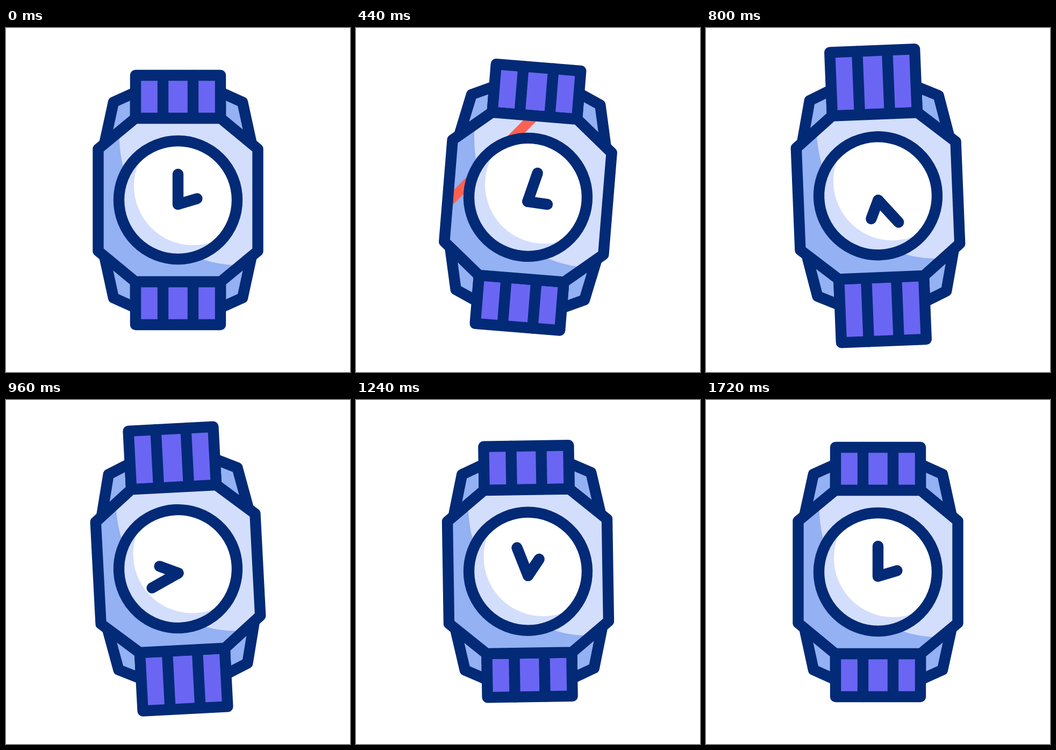
These frames come from a looping animation (640 px wide and 640 px high, 1.8 s). An HTML page with a canvas:

```html
<!DOCTYPE html>
<html lang="en">
<head>
<meta charset="utf-8">
<title>Watch</title>
<style>
  html, body { margin: 0; width: 100%; height: 100%; overflow: hidden; background: #fff; }
  canvas { display: block; width: 100vw; height: 100vh; }
</style>
</head>
<body>
<canvas id="stage" width="640" height="640"></canvas>
<script>
const ctx = document.getElementById('stage').getContext('2d');

const NAVY = '#032a76', PURPLE = '#6a66f3', MID = '#93b1f3';
const LIGHT = '#d3defd', RED = '#ff6150', WHITE = '#fff';
const LOOP = 1800, STEP = 40, LINE = 20.4;

// Keyframes as [time, value]
const TILT = [[40, 0], [525, 5], [865, -3], [930, -3], [1420, 0]];
const LIFT = [[60, 0], [700, -8], [720, -8], [1420, 0]];
const STRETCH = [[280, 0], [745, 38.2], [790, 38.2], [1300, 0]];
const SHINE = [[280, -255], [787, 258]];

const sineEase = x => (1 - Math.cos(Math.PI * x)) / 2;
const cubicEase = x => x < 0.5 ? 4 * x ** 3 : 1 - 4 * (1 - x) ** 3;
const progress = (t, from, to) => Math.min(1, Math.max(0, (t - from) / (to - from)));
const rad = deg => deg * Math.PI / 180;

function track(keys, t) {
  let value = keys[0][1];
  for (let i = 1; i < keys.length; i++) {
    const [t0, v0] = keys[i - 1], [t1, v1] = keys[i];
    if (t > t0) value = v0 + (v1 - v0) * sineEase(progress(t, t0, t1));
  }
  return value;
}

function trace(points, closed) {
  ctx.beginPath();
  points.forEach(([x, y]) => ctx.lineTo(x, y));
  if (closed) ctx.closePath();
}

function ellipse(x, y, rx, ry, color) {
  ctx.beginPath();
  ctx.ellipse(x, y, rx, ry, 0, 0, 2 * Math.PI);
  ctx.fillStyle = color;
  ctx.fill();
}

function shape(points, color) {
  trace(points, true);
  ctx.fillStyle = color;
  ctx.fill();
  ctx.stroke();
}

function line(x0, y0, x1, y1) {
  trace([[x0, y0], [x1, y1]]);
  ctx.stroke();
}

// All parts use coordinates relative to the dial centre.
function lug(sx) {
  shape([[sx * 137, -104], [sx * 120, -182], [sx * 79, -200.5], [sx * 79, -152]], MID);
}

function strap(stretch) {
  const top = -232 - stretch;
  shape([[-79, top], [79, top], [79, -152], [-79, -152]], PURPLE);
  line(-28, top, -28, -152);
  line(28, top, 28, -152);
}

function band(stretch) {
  for (const side of [1, -1]) {
    ctx.save();
    ctx.scale(1, side);
    lug(-1);
    lug(1);
    strap(stretch);
    ctx.restore();
  }
}

function shine(tilt, offset) {
  ctx.save();
  ctx.rotate(rad(45 - tilt));
  ctx.fillStyle = RED;
  ctx.fillRect(offset / Math.SQRT2 - 9.2, -300, 18.4, 600);
  ctx.restore();
}

function body(tilt, t) {
  const half = [[-148.5, -95], [-79.5, -152], [79.5, -152], [148.5, -95]];
  const outline = half.concat(half.map(([x, y]) => [-x, -y]));
  ctx.save();
  trace(outline, true);
  ctx.clip();
  ctx.fillStyle = MID;
  ctx.fillRect(-160, -160, 320, 320);
  ellipse(110, -125, 219.5, 246, LIGHT);
  if (t > SHINE[0][0] && t < SHINE[1][0]) shine(tilt, track(SHINE, t));
  ctx.restore();
  trace(outline, true);
  ctx.stroke();
}

function dial() {
  ctx.save();
  ctx.beginPath();
  ctx.arc(0, 0, 110, 0, 2 * Math.PI);
  ctx.clip();
  ctx.fillStyle = LIGHT;
  ctx.fillRect(-110, -110, 220, 220);
  ellipse(28, -26, 110, 110, WHITE);
  ctx.restore();
  ctx.beginPath();
  ctx.arc(0, 0, 110, 0, 2 * Math.PI);
  ctx.stroke();
}

function hand(deg, length) {
  const a = rad(deg);
  line(0, 8, length * Math.sin(a), 8 - length * Math.cos(a));
}

function draw(t) {
  const tilt = track(TILT, t);
  ctx.setTransform(1, 0, 0, 1, 0, 0);
  ctx.fillStyle = WHITE;
  ctx.fillRect(0, 0, 640, 640);
  ctx.translate(320, 320 + track(LIFT, t));
  ctx.rotate(rad(tilt));
  ctx.strokeStyle = NAVY;
  ctx.lineWidth = LINE;
  ctx.lineJoin = ctx.lineCap = 'round';
  band(track(STRETCH, t));
  body(tilt, t);
  dial();
  hand(360 * cubicEase(progress(t, 120, 1600)), 56);
  hand(73.5 + 360 * cubicEase(progress(t, 20, 1762)), 37);
}

const start = performance.now();
function frame() {
  const t = (performance.now() - start) % LOOP;
  draw(Math.min(1720, Math.floor(t / STEP) * STEP));
  requestAnimationFrame(frame);
}
frame();
</script>
</body>
</html>
```
